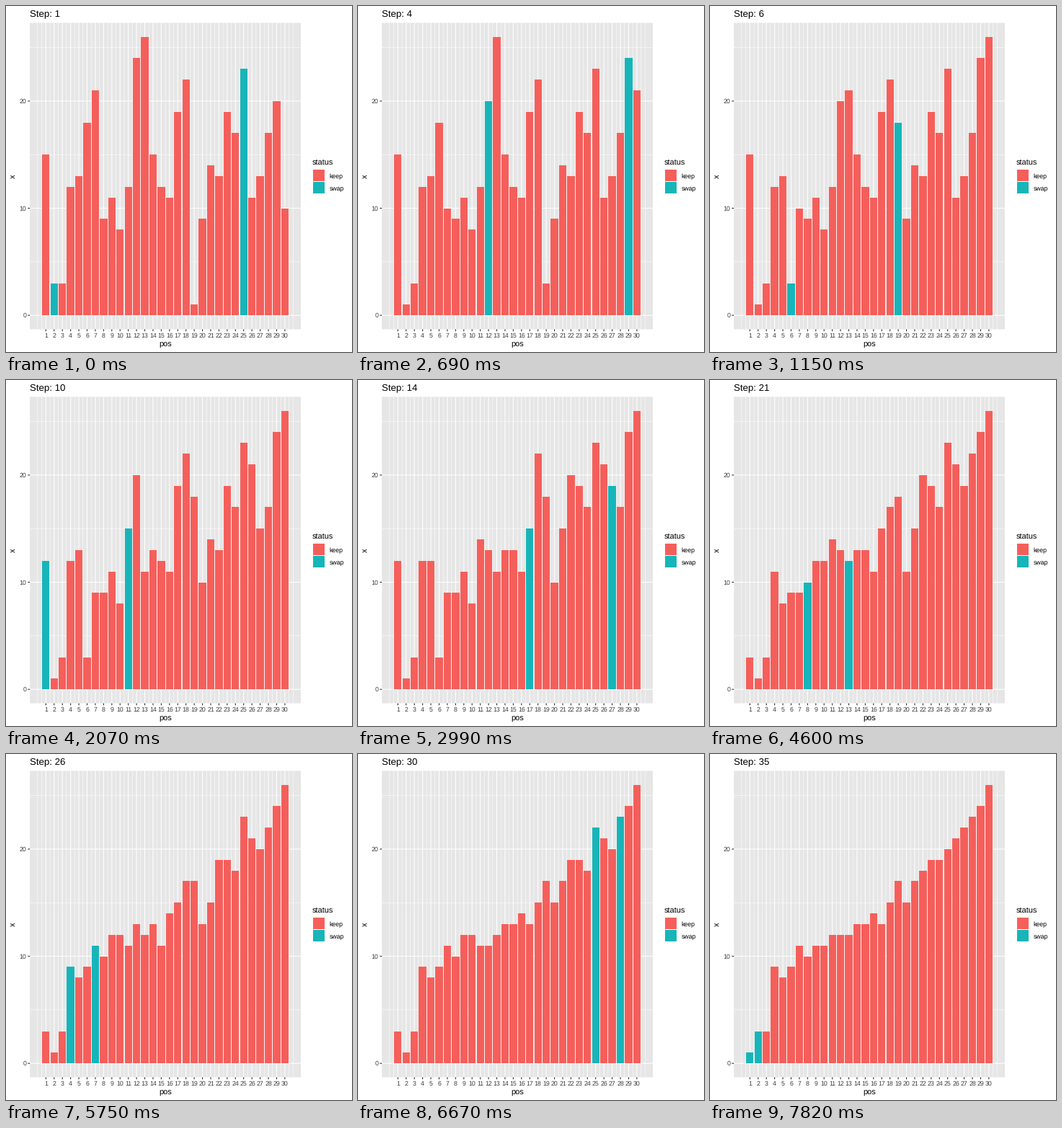
These frames come from a looping animation (480x480 px, 8000 ms). A matplotlib script:

```python
import matplotlib.pyplot as plt
from matplotlib.animation import FuncAnimation
from matplotlib.patches import Rectangle

SIZE, DPI = 480, 80
LOOP, TICK, HOLD = 8000, 20, 230          # ms
PT = 72 / DPI                             # points per pixel

KEEP, SWAP = "#F55F5B", "#17B5B9"
PANEL, TICK_COLOR, LABEL_COLOR = "#E6E6E6", "#252525", "#3C3C3C"

DATA = [15, 23, 3, 12, 13, 18, 21, 9, 11, 8, 12, 24, 26, 15, 12,
        11, 19, 22, 1, 9, 14, 13, 19, 17, 3, 11, 13, 17, 20, 10]

# Panel edges and data ranges, with 5% padding on each side
LEFT, RIGHT, TOP, BOTTOM = 33.1, 409.1, 23.4, 448.5
N = len(DATA)
BAR = 0.9
X_PAD, Y_PAD = 0.05 * (N - 1 + BAR), 0.05 * max(DATA)
X_MIN = 1 - BAR / 2 - X_PAD
X_UNIT = (RIGHT - LEFT) / (N - 1 + BAR + 2 * X_PAD)
Y_UNIT = (BOTTOM - TOP) / (max(DATA) + 2 * Y_PAD)

plt.rcParams["font.family"] = "Liberation Sans"
plt.rcParams["text.hinting"] = "none"


def comb_sort(values):
    """Yield the values and the swapped pair after every swap."""
    values, gap = list(values), len(values)
    while gap > 1:
        gap = gap * 10 // 13              # shrink by 1.3
        for i in range(len(values) - gap):
            j = i + gap
            if values[i] > values[j]:
                values[i], values[j] = values[j], values[i]
                yield values[:], (i, j)


def px(pos):
    return LEFT + (pos - X_MIN) * X_UNIT


def py(value):
    return BOTTOM - (value + Y_PAD) * Y_UNIT


fig = plt.figure(figsize=(SIZE / DPI, SIZE / DPI), dpi=DPI, facecolor="white")
ax = fig.add_axes([0, 0, 1, 1])
ax.set_xlim(0, SIZE)
ax.set_ylim(SIZE, 0)
ax.axis("off")


def box(x, y, w, h, color, z=1, snap=False):
    return ax.add_patch(Rectangle((x, y), w, h, facecolor=color, zorder=z,
                                  snap=snap, linewidth=0))


def label(x, y, text, size, color="black", **kw):
    return ax.text(x, y, text, fontsize=size * PT, color=color,
                   va="baseline", **kw)


def vlines(xs, y0, y1, color, width):
    ax.vlines(xs, y0, y1, colors=color, linewidths=width * PT,
              snap=False, zorder=2)


def hlines(ys, x0, x1, color, width):
    ax.hlines(ys, x0, x1, colors=color, linewidths=width * PT,
              snap=False, zorder=2)


def draw_axes():
    box(LEFT, TOP, RIGHT - LEFT, BOTTOM - TOP, PANEL)
    minor = [0, N + 1] + [k + 0.5 for k in range(N + 1)]
    hlines([py(v) for v in range(5, 26, 10)], LEFT, RIGHT, "white", 0.53)
    vlines([px(p) for p in minor], TOP, BOTTOM, "white", 0.53)

    marks = range(0, 21, 10)
    rows = [py(v) for v in marks]
    cols = [px(p) for p in range(1, N + 1)]
    hlines(rows, LEFT, RIGHT, "white", 1.07)
    vlines(cols, TOP, BOTTOM, "white", 1.07)
    hlines(rows, LEFT - 2.75, LEFT, TICK_COLOR, 1.07)
    vlines(cols, BOTTOM, BOTTOM + 2.75, TICK_COLOR, 1.07)

    for y, v in zip(rows, marks):
        label(28.2, y + 3.2, str(v), 8.8, LABEL_COLOR, ha="right")
    for p, x in enumerate(cols, 1):
        label(x, 460, str(p), 8.8, LABEL_COLOR, ha="center")
    label((LEFT + RIGHT) / 2, 472.6, "pos", 11, ha="center")
    label(13, (TOP + BOTTOM) / 2, "x", 11, ha="center",
          rotation=90, rotation_mode="anchor")


def draw_legend():
    x, y, key, inset = 425.6, 226.4, 17.28, 0.71
    label(x - 0.6, 220, "status", 11)
    for k, (name, color) in enumerate((("keep", KEEP), ("swap", SWAP))):
        top = y + k * key
        box(x + inset, top + inset, key - 2 * inset, key - 2 * inset,
            color, snap=True)
        label(x + key + 5.5, top + key / 2 + 3.7, name, 8.8)


draw_axes()
draw_legend()
title = label(LEFT, 14.4, "", 13.2)
bars = [box(px(p) - BAR * X_UNIT / 2, py(0), BAR * X_UNIT, 0, KEEP, 4, True)
        for p in range(1, N + 1)]
# The loop ends before the sort does
STEPS = list(comb_sort(DATA))[:-(-LOOP // HOLD)]


def update(i):
    step = min((i * TICK + TICK // 2) // HOLD, len(STEPS) - 1)
    values, pair = STEPS[step]
    title.set_text(f"Step: {step + 1}")
    for k, (bar, value) in enumerate(zip(bars, values)):
        bar.set_height(-value * Y_UNIT)
        bar.set_facecolor(SWAP if k in pair else KEEP)
    return [title, *bars]


anim = FuncAnimation(fig, update, frames=LOOP // TICK, interval=TICK,
                     init_func=lambda: update(0), repeat=True,
                     repeat_delay=0, blit=False)
plt.show()
```
